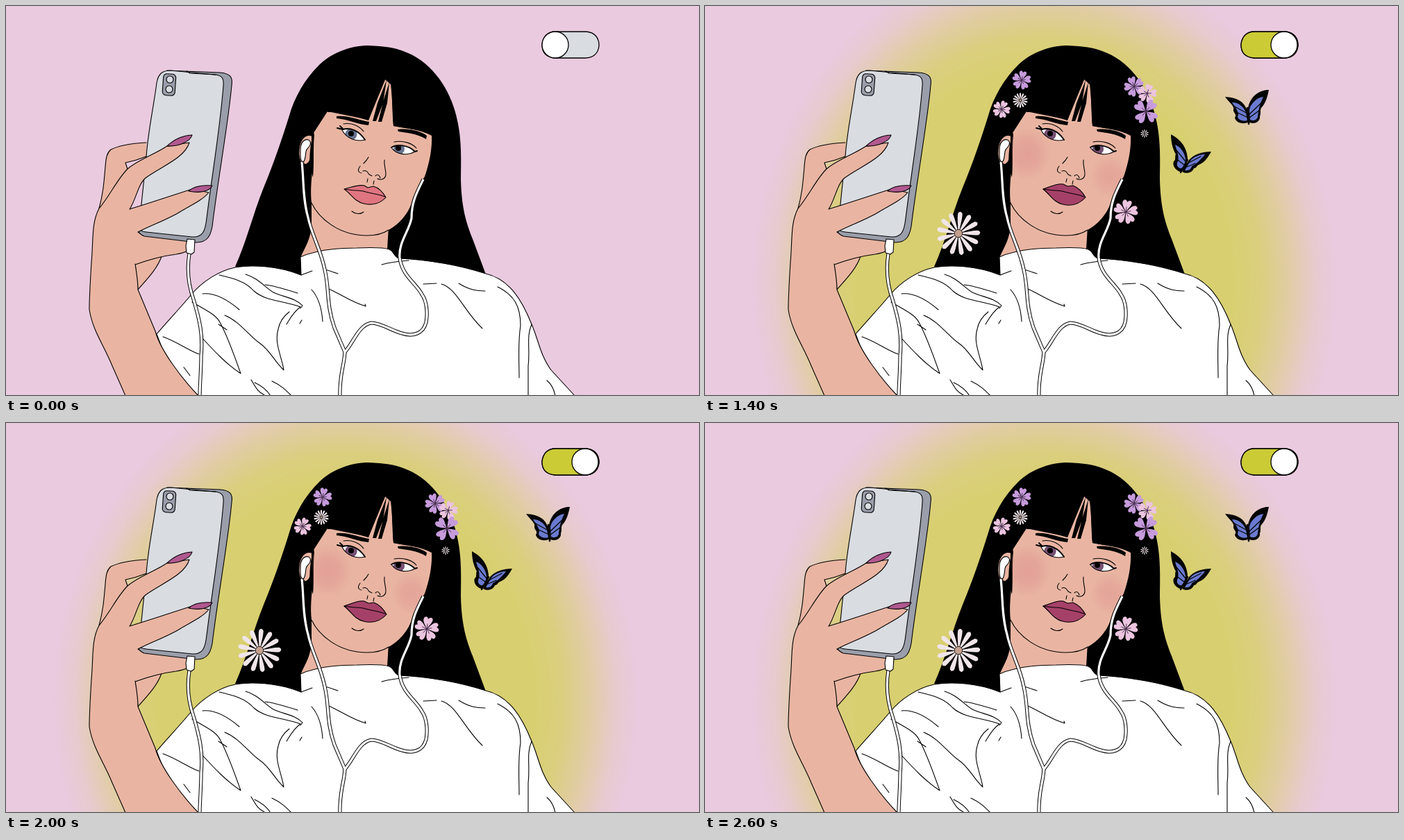
These frames come from a looping animation (998x561 px, 2.8 s). An HTML page:

```html
<!DOCTYPE html>
<html lang="en">
<head>
<meta charset="utf-8">
<title>Selfie filter</title>
<style>
  html, body { margin: 0; width: 100%; height: 100%; overflow: hidden; background: #eacadf; }
  svg { display: block; width: 100%; height: 100%; }
  .ink { fill: none; stroke: #000; stroke-width: 1.1; stroke-linecap: round; stroke-linejoin: round; }
  .skin { fill: #e9b5a2; }
  .on, .off, .pose { animation: 2.8s step-end infinite; }
  .on { animation-name: on; }
  .off { animation-name: off; }
  .pose { opacity: 0; }
  .pose0 { animation-name: up; }
  .pose1 { animation-name: mid; }
  .pose2 { animation-name: open; }
  @keyframes on { 0% { opacity: 0; } 35.714%, 100% { opacity: 1; } }
  @keyframes off { 0% { opacity: 1; } 35.714%, 100% { opacity: 0; } }
  @keyframes up {
    0%, 42.857%, 64.285%, 85.714%, 100% { opacity: 0; }
    35.714%, 57.142%, 78.571% { opacity: 1; }
  }
  @keyframes mid {
    0%, 50%, 71.428%, 92.857%, 100% { opacity: 0; }
    42.857%, 64.285%, 85.714% { opacity: 1; }
  }
  @keyframes open {
    0%, 57.142%, 78.571% { opacity: 0; }
    50%, 71.428%, 92.857%, 100% { opacity: 1; }
  }
</style>
</head>
<body>
<svg viewBox="0 0 998 561" preserveAspectRatio="none">
  <defs>
    <radialGradient id="glow">
      <stop offset=".64" stop-color="#d8cf70"/>
      <stop offset=".74" stop-color="#d8cf70" stop-opacity=".88"/>
      <stop offset=".84" stop-color="#d8cf70" stop-opacity=".52"/>
      <stop offset=".93" stop-color="#d8cf70" stop-opacity=".14"/>
      <stop offset="1" stop-color="#d8cf70" stop-opacity="0"/>
    </radialGradient>
    <radialGradient id="blush">
      <stop offset="0" stop-color="#dc8a8a" stop-opacity=".48"/>
      <stop offset=".5" stop-color="#dc8a8a" stop-opacity=".36"/>
      <stop offset="1" stop-color="#dc8a8a" stop-opacity="0"/>
    </radialGradient>
    <clipPath id="face">
      <path id="facePath" d="M463,152 L443,183 C440,195 442,210 442,228 C440,250 438,265 440,284 C450,305 478,331 520,331 C540,331 555,322 566,312 C578,300 582,291 585,281 C590,266 597,256 603,246 C610,226 614,205 613,186 L600,180 L558,173 L555,114 L546,106 L522,164 Z"/>
    </clipPath>
    <clipPath id="eyeL"><path d="M484,179 C493,175 508,179 517,193 C505,196 491,192 484,179Z"/></clipPath>
    <clipPath id="eyeR"><path d="M555,204 C563,199 579,200 589,210 C578,216 562,215 555,204Z"/></clipPath>
  </defs>

  <rect width="998" height="561" fill="#eacadf"/>
  <ellipse class="on" cx="489" cy="400" rx="420" ry="480" fill="url(#glow)"/>

  <!-- hair and head -->
  <path d="M330,376 C347,338 355,302 371,262 C386,226 398,190 408,158 C415,133 430,105 452,84 C470,67 497,57 522,57 C546,58 559,60 572,65 C609,78 636,113 647,153 C655,182 656,205 655,250 C656,292 663,313 672,336 L691,387 L560,420 H425Z"/>
  <path class="skin" d="M440,270 V312 C440,335 431,347 425,361 V380 H552 L549,351 L551,318Z"/>
  <use href="#facePath" class="skin"/>
  <path class="skin" d="M440,187 C431,184 423,193 422,207 C421,220 424,228 430,228 C436,228 439,220 440,210Z"/>
  <path class="ink" d="M440,187 C431,184 423,193 422,207 C421,220 424,228 430,227"/>
  <path d="M443,181 C439,196 436,215 438,234 L442,247 C444,225 442,205 444,186Z"/>
  <path d="M463,153 L480,153 L522,165 L532,140 L546,106 L510,90 L470,120Z"/>
  <path d="M528,166 L535,140 L548,107 L543,140 L533,166Z M536,167 L544,135 L552,110 L549,140 L541,167Z"/>
  <path d="M558,173 C556,155 557,135 554,113 L590,110 L616,150 L613,187 C595,177 575,177 558,173Z"/>
  <g class="on" clip-path="url(#face)">
    <ellipse cx="464" cy="213" rx="34" ry="38" fill="url(#blush)"/>
    <ellipse cx="583" cy="246" rx="28" ry="30" fill="url(#blush)" opacity=".8"/>
  </g>
  <path class="ink" d="M440,284 C450,305 478,331 520,331 C537,331 545,327 551,323"/>

  <!-- eyes -->
  <g clip-path="url(#eyeL)">
    <rect x="480" y="170" width="42" height="30" fill="#fff"/>
    <circle cx="497" cy="185" r="8.5" fill="#68748f"/>
    <circle class="on" cx="497" cy="185" r="8.5" fill="#765174"/>
    <circle cx="497" cy="184" r="4"/>
  </g>
  <g clip-path="url(#eyeR)">
    <rect x="550" y="195" width="42" height="24" fill="#fff"/>
    <circle cx="566" cy="206" r="8" fill="#68748f"/>
    <circle class="on" cx="566" cy="206" r="8" fill="#765174"/>
    <circle cx="565" cy="205" r="4"/>
  </g>
  <path class="ink" d="M484,179 C491,192 505,196 517,193 M555,204 C562,215 578,216 589,210"/>
  <path class="ink" style="stroke-width:1.9" d="M477,176 L485,178 C495,175 508,179 517,193 M555,204 C563,199 579,200 589,210 L592,209 M481,173 L486,178"/>
  <path class="ink" d="M486,170 C498,168 509,173 515,181 M559,196 C573,193 586,199 591,205"/>
  <path d="M476,159 C492,157 510,165 523,167 L522,172 C508,171 490,163 476,162Z M564,178 C582,176 598,181 606,187 L605,192 C592,184 578,183 565,181Z"/>

  <!-- nose and mouth -->
  <path class="ink" d="M522,218 C520,222 517,225 515,227 M510,231 C506,236 507,240 512,241 M514,238 C519,236 521,240 523,243 L527,245 M532,245 C535,242 538,244 539,248 M535,249 C541,252 547,249 547,242 C547,235 544,230 545,222 M521,249 L520,254 M530,252 L529,257 M498,296 C503,300 510,301 515,297"/>
  <path class="ink" style="fill:#df7580" d="M487,264 C499,261 509,257 516,259 L521,262 L529,260 C537,262 543,269 547,276 C539,285 527,288 515,285 C502,282 497,271 487,264Z"/>
  <path class="on ink" style="fill:#a54168" d="M487,264 C497,261 507,255 516,257 L522,260 L530,259 C538,262 544,269 548,276 C539,286 527,289 515,286 C502,283 497,272 487,264Z"/>
  <path class="ink" d="M489,264 C500,267 510,265 518,268 C528,271 536,271 546,275"/>

  <!-- shirt -->
  <path class="ink" style="fill:#fff" d="M217,473 C235,452 254,432 267,416 C282,398 306,382 330,377 C352,373 390,374 425,388 L424,362 C442,354 472,349 505,349 C529,348 543,348 552,351 C559,354 558,361 566,364 C606,366 650,373 691,386 C725,394 743,424 757,459 C767,482 769,503 785,525 L819,562 H250Z"/>
  <g class="ink">
    <path d="M307,388 C328,393 345,397 357,411 C374,426 400,425 424,434 C414,441 409,451 404,459"/>
    <path d="M345,387 C363,392 372,405 385,413 C400,420 417,421 427,432 L424,436"/>
    <path d="M373,402 C385,403 404,409 420,414 M283,415 C302,413 322,426 336,438"/>
    <path d="M315,446 C337,455 350,476 365,486 C380,496 386,512 400,525 C397,505 386,486 392,466 C394,456 399,448 408,441"/>
    <path d="M268,427 C290,440 302,445 308,456 C320,478 329,505 338,530 C318,517 300,498 281,477 M306,459 L318,467"/>
    <path d="M226,477 C246,484 265,498 278,502 M256,521 L265,533"/>
    <path d="M353,539 C360,551 363,557 372,561 M358,543 C369,548 375,553 381,562 M383,541 C396,547 402,553 411,562"/>
    <path d="M440,409 C451,421 455,440 456,455 M457,379 L478,386 M425,388 L441,382 M465,408 C481,415 497,427 518,433 L517,430 M423,458 L426,453"/>
    <path d="M541,373 C555,369 567,368 580,367 M601,401 L620,400 M627,401 C649,407 660,441 686,465 M652,400 C668,410 679,411 690,411"/>
    <path d="M708,405 C732,417 741,433 741,461 C737,485 739,511 739,536 M757,459 C749,477 755,494 752,519 L752,562 M779,540 C785,545 789,552 791,562"/>
  </g>
  <g id="flowers" class="on"></g>

  <!-- far side of the hand -->
  <path class="skin" d="M202,197 C184,198 163,201 151,207 C145,212 144,219 143,232 C141,255 140,270 134,292 L165,270 L175,235 L172,226 C182,224 192,221 202,217Z"/>
  <path class="ink" d="M134,292 C140,270 141,255 143,232 C144,219 145,212 151,207 C163,201 184,198 202,197 M175,235 L172,226 C182,224 192,221 202,217"/>
  <path class="ink skin" style="fill:#e9b5a2" d="M186,372 L224,361 C218,379 203,394 190,409Z"/>
  <path class="ink" style="fill:#e9b5a2" d="M186,326 L270,340 C270,351 258,356 245,358 C222,361 202,367 186,373"/>

  <!-- phone -->
  <path class="ink" style="fill:#9a9eaa" d="M232,93 L308,96 C322,97 327,102 325,114 C321,162 306,246 298,310 C296,332 290,341 274,341 L199,332 C192,329 190,326 191,319Z"/>
  <path class="ink" style="fill:#d9dce1" d="M237,93 L300,99 C311,100 314,104 313,115 C309,171 297,242 289,306 C287,325 283,334 268,333 L202,326 C194,325 191,323 192,315 L202,218 C204,184 212,149 217,111 C219,99 224,93 237,93Z"/>
  <path class="ink" d="M260,94 L265,97 L302,99"/>
  <rect class="ink" style="fill:#9a9eaa" x="226" y="98" width="18" height="31" rx="5" transform="rotate(4 235 113)"/>
  <g class="ink" style="fill:#d9dce1"><circle cx="236" cy="106" r="5"/><circle cx="235" cy="120" r="5"/></g>

  <!-- near side of the hand, arm -->
  <path class="ink" style="fill:#e9b5a2" d="M190,326 C207,317 235,307 252,296 C269,286 284,279 292,269 L268,264 C240,273 210,283 178,293 C187,280 190,257 201,248 C222,232 257,220 264,197 L232,202 C214,214 190,222 175,235 C160,250 150,273 134,292 C123,313 126,335 123,370 C121,402 120,420 120,438 C125,469 142,491 153,519 L172,562 H277 C253,537 222,496 215,469 L190,409 C190,395 188,385 186,372"/>
  <g class="ink" style="fill:#b0588f">
    <path d="M232,202 C242,192 254,187 268,186 C266,195 249,203 232,202Z"/>
    <path d="M263,267 C270,260 282,258 297,259 C293,268 278,270 263,267Z"/>
  </g>

  <!-- earphones -->
  <g id="wires"></g>
  <path class="ink" style="fill:#fff" d="M261,336 L272,337 L271,355 L267,358 L260,356 L259,346Z"/>
  <path class="ink" style="fill:#fff" d="M428,195 C434,190 440,194 438,200 C437,205 433,204 432,210 C431,217 431,223 428,225 C424,224 424,219 424,212 C424,204 424,199 428,195Z"/>

  <!-- switch -->
  <g class="ink" style="stroke-width:1.3">
    <path id="pill" style="fill:#d9dce0" d="M791,37 L836,37 C848,38 854,46 854,57 C853,69 845,75 834,75 L791,75 C778,74 772,67 772,56 C773,44 780,37 791,37Z"/>
    <path class="on" style="fill:#cbcb36" d="M791,37 L836,37 C848,38 854,46 854,57 C853,69 845,75 834,75 L791,75 C778,74 772,67 772,56 C773,44 780,37 791,37Z"/>
    <circle class="off" style="fill:#fff" cx="791" cy="56" r="19"/>
    <circle class="on" style="fill:#fff" cx="834" cy="56" r="19"/>
  </g>
  <g id="butterflies"></g>
</svg>
<script>
const $ = id => document.getElementById(id);

// Thin outlined cables
const wires = [
  'M264,357 C260,382 264,406 270,423 C279,453 284,475 281,505 C281,528 279,545 279,563',
  'M426,225 C429,250 427,277 435,305 C440,330 453,350 459,380 C466,409 461,430 473,464 L488,499',
  'M601,250 C591,270 584,283 584,306 C580,326 565,341 567,363 C570,389 591,400 599,416 C607,427 607,446 605,456 C601,473 586,477 570,472 C555,468 540,457 526,457 C508,460 500,486 488,499',
  'M488,499 C487,520 480,530 481,563'
];
const cable = (color, width) => wires.map(d =>
  `<path d="${d}" fill="none" stroke="${color}" stroke-width="${width}"/>`).join('');
$('wires').innerHTML = cable('#000', 5.2) + cable('#fff', 3.2);

// Flowers in the hair
const ring = (x, y, n, turn, petal) => Array.from({ length: n }, (_, i) =>
  `<g transform="translate(${x} ${y}) rotate(${turn + i * 360 / n})">${petal}</g>`).join('');

function blossom(x, y, r, turn, color, n = 5) {
  const petal = `<path transform="scale(${r / 10})" fill="${color}" d="M0,0 C-1,-2.5 -5,-6 -3.2,-9 Q-1,-10.8 0,-8 Q2,-10.5 3.6,-8.6 C4.6,-6 1,-2.5 0,0Z"/>
    <path d="M0,-1 V${-r * .42}" stroke="#503058" stroke-width=".9"/>`;
  return ring(x, y, n, turn, petal) + `<circle cx="${x}" cy="${y}" r="${r / 10}" fill="#503058"/>`;
}
function daisy(x, y, r, n, turn) {
  const petal = `<path transform="scale(${r / 10})" fill="#f0e5e8" d="M-.3,-1.5 C-.6,-4 -1.2,-7 -1,-9 Q0,-10.6 1,-9 C1.2,-7 .6,-4 .3,-1.5Z"/>`;
  return ring(x, y, n, turn, petal) +
    `<circle cx="${x}" cy="${y}" r="${r * .18}" fill="#c3a08d" stroke="#000" stroke-width=".8"/>`;
}
const lilac = '#c69bdc', rose = '#ebc4df';
$('flowers').innerHTML =
  blossom(456, 107, 14, 10, lilac) + daisy(454, 136, 11, 14, 0) +
  blossom(427, 149, 13, 25, rose) + blossom(618, 116, 15, -20, lilac) +
  blossom(637, 126, 14, 15, rose) + blossom(635, 152, 19, 40, lilac, 4) +
  daisy(633, 184, 6, 10, 0) + blossom(606, 297, 18, 8, rose) +
  daisy(365, 328, 32, 13, 5);

// Each butterfly part: wings up, wings open
const black = '#050505', blue = '#6a7ad0';
const parts = [
  [black, 'M755,126 C765,127 775,131 779,148 L784,168 C776,172 767,168 766,160 C767,155 763,153 762,149 C764,145 757,133 755,126Z',
          'M749,131 C762,132 775,135 780,149 L783,167 C775,172 764,168 763,161 C767,156 760,154 761,149 C763,145 755,139 749,131Z'],
  [black, 'M806,117 C797,118 786,130 783,147 L785,168 C792,167 796,163 795,157 C799,152 799,147 799,142 C805,133 806,125 806,117Z',
          'M812,121 C800,121 786,128 782,147 L784,168 C793,171 800,166 799,159 C801,154 799,150 801,147 C808,140 810,130 812,121Z'],
  [blue,  'M765,137 C774,139 777,146 780,155 L782,165 C776,167 770,164 769,160 C771,154 767,148 765,137Z',
          'M759,139 C768,139 776,145 779,154 L781,165 C775,167 768,164 767,160 C770,154 765,148 759,139Z'],
  [blue,  'M798,130 C790,132 786,142 785,150 L786,164 C790,163 793,160 792,155 C796,150 796,141 798,130Z',
          'M804,131 C794,132 785,142 784,150 L785,164 C791,167 796,163 796,159 C797,153 797,146 804,131Z'],
  ['',    'M781,147 L785,172', 'M781,147 L783,170', 2.6],
  ['',    'M782,155 L767,143 M783,161 L767,152 M784,156 L798,138 M784,161 L797,148',
          'M781,155 L761,144 M782,161 L765,153 M784,156 L803,138 M784,161 L799,150', 1.3],
  [black, 'M682,181 C690,187 698,203 699,222 C694,234 687,243 680,242 C674,237 674,226 673,219 C676,217 678,216 679,213 C677,202 678,190 682,181Z',
          'M671,185 C682,191 693,200 695,219 C695,230 690,238 684,239 C676,236 673,229 675,224 C679,222 676,216 678,214 C673,205 671,195 671,185Z'],
  [black, 'M726,201 C716,208 706,215 698,222 L690,238 C694,236 698,230 701,226 C708,221 718,212 726,201Z',
          'M729,210 C716,210 704,214 697,222 L687,239 C694,243 702,240 704,234 C708,234 708,230 711,229 C720,226 725,217 729,210Z'],
  [blue,  'M684,194 C690,201 694,211 695,222 C691,231 686,237 681,236 C677,231 678,224 680,220 C684,214 683,204 684,194Z',
          'M677,200 C685,203 691,212 692,221 C691,230 687,235 684,234 C679,232 679,227 681,224 C683,215 679,208 677,200Z'],
  [blue,  'M716,209 L700,222 L695,229 L700,224Z',
          'M720,214 C711,214 702,218 698,225 L691,237 C697,238 700,235 701,231 C707,228 714,222 720,214Z'],
  ['',    'M698,221 L683,240', 'M695,222 L685,240', 2.4],
  ['',    'M693,224 L682,208 M690,229 L678,221', 'M692,224 L679,208 M690,229 L678,220 M695,227 L714,217 M694,232 L706,227', 1.3]
];
// Blend two outlines point by point; unequal ones stay as they are
function blend(a, b, t) {
  const to = b.match(/[\d.]+/g);
  if (to.length !== a.match(/[\d.]+/g).length) return t < .5 ? a : b;
  let i = 0;
  return a.replace(/[\d.]+/g, n => (+n + (to[i++] - n) * t).toFixed(1));
}
const drawPose = (t, i) => `<g class="pose pose${i}">` + parts.map(([fill, up, open, width]) => {
  const d = blend(up, open, t);
  return width
    ? `<path d="${d}" fill="none" stroke="${black}" stroke-width="${width}" stroke-linecap="round"/>`
    : `<path d="${d}" fill="${fill}"/>`;
}).join('') + '</g>';
// The blue of the thin raised wing has fewer points, so it switches rather than blends
$('butterflies').innerHTML = [0, .7, 1].map(drawPose).join('');
</script>
</body>
</html>
```
